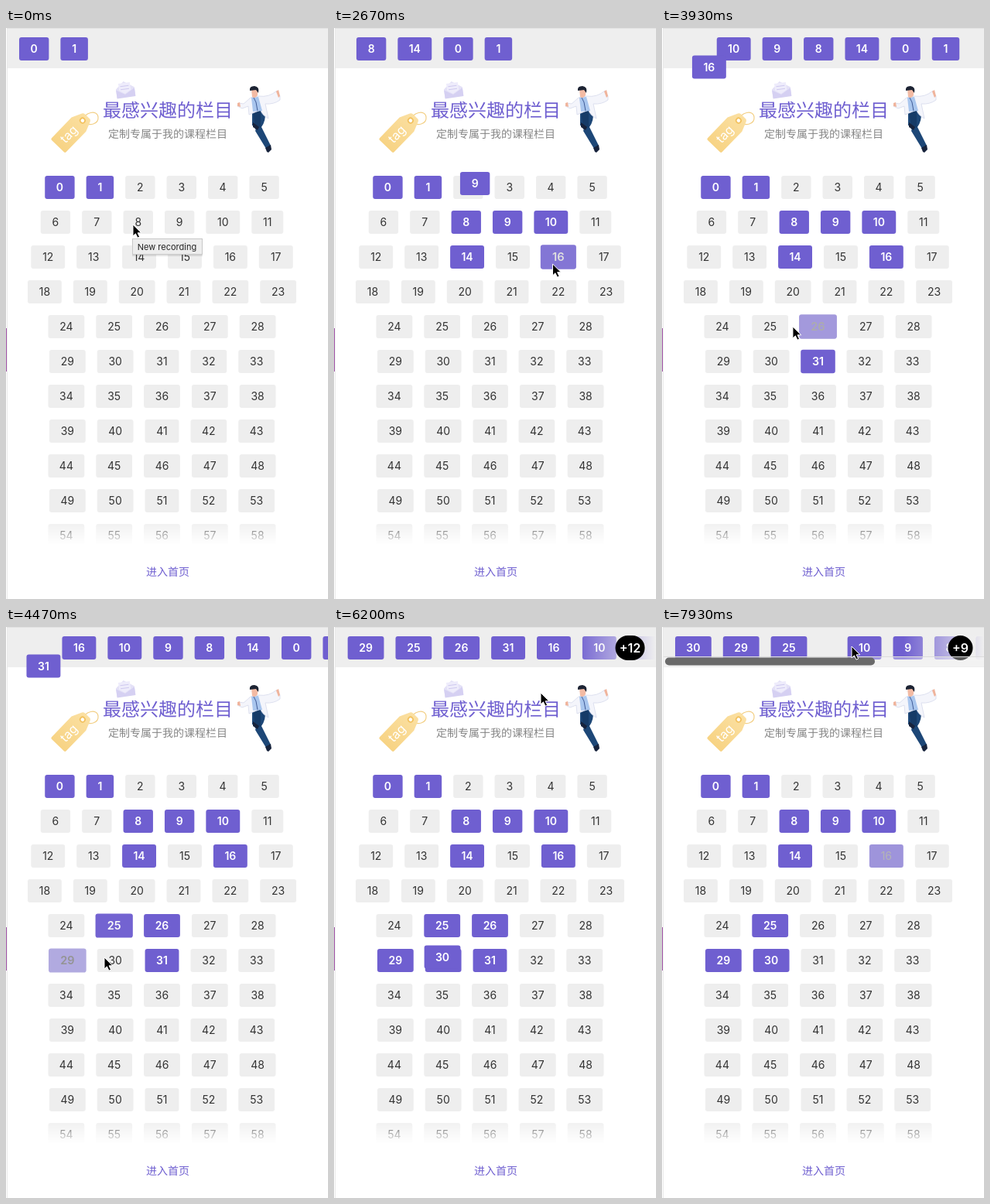
An HTML page that plays this animation: 416 px wide and 738 px high, repeating every 8000 ms.

```html
<!DOCTYPE html>
<html lang="zh">
<head>
<meta charset="utf-8">
<style>
html, body { margin: 0; width: 100%; height: 100%; overflow: hidden; background: #fff; }
svg { display: block; width: 416px; height: 738px; }
text { text-anchor: middle; font-family: Inter, Roboto, sans-serif; }
.zh { font-family: "Noto Sans CJK SC", "Noto Sans CJK", sans-serif; }
</style>
</head>
<body>
<svg id="stage" viewBox="0 0 416 738">
  <defs>
    <linearGradient id="fadeX">
      <stop offset="0" stop-color="#efefef" stop-opacity="0"/>
      <stop offset="1" stop-color="#efefef"/>
    </linearGradient>
    <linearGradient id="fadeY" x2="0" y2="1">
      <stop offset="0" stop-color="#fff" stop-opacity="0"/>
      <stop offset="1" stop-color="#fff"/>
    </linearGradient>
    <linearGradient id="gold" x2="1" y2="0">
      <stop offset="0" stop-color="#f7d384"/>
      <stop offset="1" stop-color="#fbe0a2"/>
    </linearGradient>
  </defs>
  <rect width="416" height="738" fill="#fff"/>
  <rect x="1" width="1" height="738" fill="#e9e9e9"/>
  <rect x="2" y="1" width="414" height="51" fill="#eee"/>
  <rect x="1" width="415" height="1" fill="#e3e3e3"/>
  <rect y="388" width="1" height="56" fill="#a253a8"/>

  <!-- envelope -->
  <g transform="rotate(-8 153 79)">
    <path d="M142 78 L153 69 L166 78 V89 H142Z" fill="#e4e1f7"/>
    <path d="M146 71 H161 V81 L153 85 L146 80Z" fill="#eeecfb"/>
    <path d="M148 75 H159 M148 79 H159" stroke="#cfc9ef"/>
    <path d="M142 79 L153 86 L166 79 V90 H142Z" fill="#d5d0f2"/>
  </g>

  <!-- tag -->
  <path d="M99 119 C101 109 118 105 119 115 C120 124 108 128 99 121" fill="none" stroke="#f2cf85" stroke-width="1.2"/>
  <g transform="translate(85 134) rotate(-46)">
    <path d="M-26 -11 Q-26 -13 -24 -13 H13 L26 -7 Q28 -6 28 -4 V5 Q28 7 26 8 L13 13 H-24 Q-26 13 -26 11Z" fill="url(#gold)"/>
    <circle cx="20" r="4" fill="#f3c25f"/>
    <circle cx="20" r="2.3" fill="#fff"/>
    <text x="-5" y="5" font-size="16" fill="#fff">tag</text>
  </g>

  <!-- jumping man -->
  <path d="M318 105 L335 106 Q336 120 330 128 L342 152 L336 156 L322 133 L324 127 L318 126Z" fill="#1d4777"/>
  <path d="M319 106 L329 108 L329 128 L322 131Z" fill="#163b67"/>
  <path d="M335 155 L342 151 L343 157 L339 161 L337 160Z M319 122 L327 128 L325 132 L319 128Z" fill="#17233c"/>
  <path d="M316 90 L326 88 Q340 90 350 81 L354 88 L354 93 Q346 99 335 98 L339 117 Q330 112 329 106 L314 112 L313 101 L305 104 L299 101 L301 97 L307 98Z" fill="#f4f5fb" stroke="#d6daeb" stroke-width=".8"/>
  <path d="M317 90 L326 89 L331 107 L319 108Z" fill="#a9c6ee"/>
  <path d="M320 90 L323 96 L325 107" stroke="#405b96" fill="none"/>
  <path d="M349 82 L352 80 L354 88 L352 90Z M299 97 L302 96 L303 102 L299 101Z" fill="#f0b49c"/>
  <path d="M317 79 Q321 76 325 80 L325 87 Q322 92 318 89Z" fill="#f3bba4"/>
  <path d="M315 81 Q314 75 321 75 Q328 76 326 84 L323 80Z" fill="#1d2434"/>

  <g class="zh">
    <text x="209" y="115" font-size="24" font-weight="500" fill="#6f5fd0">最感兴趣的栏目</text>
    <text x="209" y="142" font-size="14" fill="#858585">定制专属于我的课程栏目</text>
    <text x="209" y="708" font-size="14" font-weight="500" fill="#6f5fd0">进入首页</text>
  </g>

  <g id="grid"></g>
  <rect x="20" y="634" width="370" height="34" fill="url(#fadeY)"/>
  <rect x="20" y="667" width="370" height="6" fill="#fff"/>
  <g id="bar"></g>
  <g id="more">
    <rect x="312" y="11" width="104" height="33" fill="url(#fadeX)"/>
    <rect id="pill" y="11" height="32" rx="16"/>
    <text id="count" y="33" font-size="16" font-weight="600" fill="#fff"></text>
  </g>
  <g id="scroll">
    <rect x="2" y="38" width="414" height="13" fill="#fafafa" fill-opacity=".35"/>
    <rect x="2" y="38" width="414" height="1" fill="#dcdcdc"/>
    <rect id="thumb" x="4" y="39.5" height="10" rx="5" fill="#6a6a6a"/>
  </g>
  <g id="tip">
    <rect x="163" y="273" width="91" height="22" fill="#000" fill-opacity=".1"/>
    <rect x="163.5" y="272.5" width="90" height="20" fill="#ededed" stroke="#c8c8c8"/>
    <text x="208" y="286.5" font-size="11" fill="#222">New recording</text>
  </g>
  <path id="arrow" d="M0 0 V15 L3.4 11.8 L6 17.2 L8.6 16 L6.1 10.8 H10.8Z" fill="#000" stroke="#fff"/>
  <path id="beam" d="M-3 -7.5 Q0 -7.5 0 -5 Q0 -7.5 3 -7.5 M0 -5 V5 M-3 7.5 Q0 7.5 0 5 Q0 7.5 3 7.5 M-2 1.5 H2" fill="none" stroke="#222"/>
</svg>
<script>
const LOOP = 8000, MOVE = 500, STEP = 511, GAP = 15, HOME = { x: 17, y: 12 };
const OFF = [238, 238, 238], ON = [111, 95, 208], INK = [51, 51, 51], WHITE = [255, 255, 255];

const $ = id => document.getElementById(id);
const clamp = v => Math.max(0, Math.min(1, v));
const lerp = (a, b, p) => a + (b - a) * p;
const mix = (a, b, p) => `rgb(${a.map((v, i) => Math.round(lerp(v, b[i], p)))})`;
const show = (el, on) => el.setAttribute('display', on ? 'inline' : 'none');

// CSS "ease": cubic-bezier(.25, .1, .25, 1)
function ease(x) {
  if (x <= 0 || x >= 1) return clamp(x);
  let lo = 0, hi = 1, s = x;
  for (let i = 0; i < 20; i++) {
    s = (lo + hi) / 2;
    const bx = .75 * s * (1 - s) + s ** 3;
    if (bx < x) lo = s; else hi = s;
  }
  return .3 * s * (1 - s) ** 2 + 3 * s * s * (1 - s) + s ** 3;
}
const run = (t, start) => ease((t - start) / MOVE);

function add(parent, tag, attrs) {
  const el = document.createElementNS('http://www.w3.org/2000/svg', tag);
  for (const k in attrs) el.setAttribute(k, attrs[k]);
  return parent.appendChild(el);
}

const widthOf = n => [...String(n)].reduce((w, d) => w + (d === '1' ? 5.5 : 8.4), 30);

function makeChip(parent, n) {
  const w = widthOf(n), g = add(parent, 'g', {});
  const box = add(g, 'rect', { width: w, height: 30, rx: 3, fill: mix(ON, ON, 0) });
  const label = add(g, 'text', { x: w / 2, y: 20.2, 'font-size': 14, 'font-weight': 600, fill: '#fff' });
  label.textContent = n;
  return { n, w, g, box, label };
}

// Number, time of the click; flights wait for one another.
const picks = [[0, -9000], [1, -9000], [14, 1290], [8, 1575], [9, 1790], [10, 2050], [16, 2400],
  [31, 3480], [26, 3760], [25, 4080], [29, 4330], [30, 4750]];
const drops = { 26: 6830, 31: 7330, 16: 7815 };

const grid = [];
for (let row = 0, n = 0; row < 11; row++) {
  const size = row < 4 ? 6 : 5;
  const chips = Array.from({ length: size }, () => makeChip($('grid'), n++));
  const total = chips.reduce((sum, c) => sum + c.w, GAP * (size - 1));
  let x = 201.5 - total / 2;
  for (const c of chips) {
    c.x = x;
    c.y = 191 + 45 * row;
    x += c.w + GAP;
    grid.push(c);
  }
}

const bar = picks.map(([n, click], i) => {
  const chip = makeChip($('bar'), n);
  chip.start = i < 2 ? -9000 : i === 11 ? 6190 : 1565 + (i - 2) * STEP;
  chip.drop = drops[n] ?? Infinity;
  grid[n].click = click;
  grid[n].drop = chip.drop;
  return chip;
});
const newestFirst = [...bar.slice(2).reverse(), bar[0], bar[1]];

// time, x, y
const path = [[0, 164, 254], [850, 164, 254], [1150, 170, 292], [1330, 171, 292], [1540, 172, 252],
  [1620, 178, 252], [1800, 254, 252], [1980, 272, 252], [2120, 276, 254], [2360, 288, 296],
  [2600, 286, 300], [3200, 195, 427], [3500, 195, 427], [3740, 198, 387], [3830, 190, 386],
  [4050, 142, 386], [4300, 84, 430], [4360, 86, 430], [4470, 127, 427], [4780, 134, 427],
  [5080, 277, 87], [5300, 277, 87], [5700, 267, 85], [6300, 267, 85], [6700, 228, 28],
  [7300, 232, 27], [7850, 245, 25], [8000, 245, 25]];

function cursorAt(t) {
  const i = path.findIndex(k => k[0] > t), a = path[i - 1], b = path[i];
  const s = (t - a[0]) / (b[0] - a[0]), p = s * s * (3 - 2 * s);
  return [lerp(a[1], b[1], p), lerp(a[2], b[2], p)];
}

function drawGrid(t) {
  for (const c of grid) {
    const picked = t >= c.click && t < c.drop;
    const p = c.click === undefined ? 0 : run(t, c.click) * (1 - run(t, c.drop));
    const k = 1 + .05 * Math.sin(Math.PI * clamp((t - c.click) / MOVE || 0));
    c.g.setAttribute('transform',
      `translate(${c.x + c.w / 2} ${c.y + 15}) scale(${k}) translate(${-c.w / 2} -15)`);
    c.box.setAttribute('fill', mix(OFF, ON, p));
    c.label.setAttribute('fill', mix(INK, WHITE, p));
    c.label.setAttribute('font-weight', picked ? 600 : 400);
  }
}

function drawBar(t) {
  let x = HOME.x;
  for (const c of newestFirst) {
    const p = run(t, c.start), from = grid[c.n];
    show(c.g, t >= c.start && t < c.drop);
    const cx = p < 1 ? lerp(from.x, HOME.x, p) : x;
    c.g.setAttribute('transform', `translate(${cx} ${lerp(from.y, HOME.y, p)})`);
    x += (c.w + GAP) * p * (1 - run(t, c.drop));
  }
}

function drawBadge(t) {
  const total = grid.filter(c => t >= c.click && t < c.drop).length;
  const w = total > 9 ? 38 : 32, x = 401.5 - w;
  show($('more'), t >= 4620);
  $('pill').setAttribute('x', x);
  $('pill').setAttribute('width', w);
  $('count').setAttribute('x', x + w / 2);
  $('count').textContent = '+' + total;
}

function draw(t) {
  drawGrid(t);
  drawBar(t);
  drawBadge(t);
  $('scroll').setAttribute('opacity', clamp((t - 6600) / 150));
  $('thumb').setAttribute('width', lerp(238, 271, clamp((t - 6830) / 1100)));
  show($('tip'), t < 270);

  const at = `translate(${cursorAt(t)})`, overText = t > 5040 && t < 5500;
  show($('arrow'), !overText);
  show($('beam'), overText);
  $('arrow').setAttribute('transform', at);
  $('beam').setAttribute('transform', at);
}

function tick() {
  draw(performance.now() % LOOP);
  requestAnimationFrame(tick);
}
tick();
</script>
</body>
</html>
```
